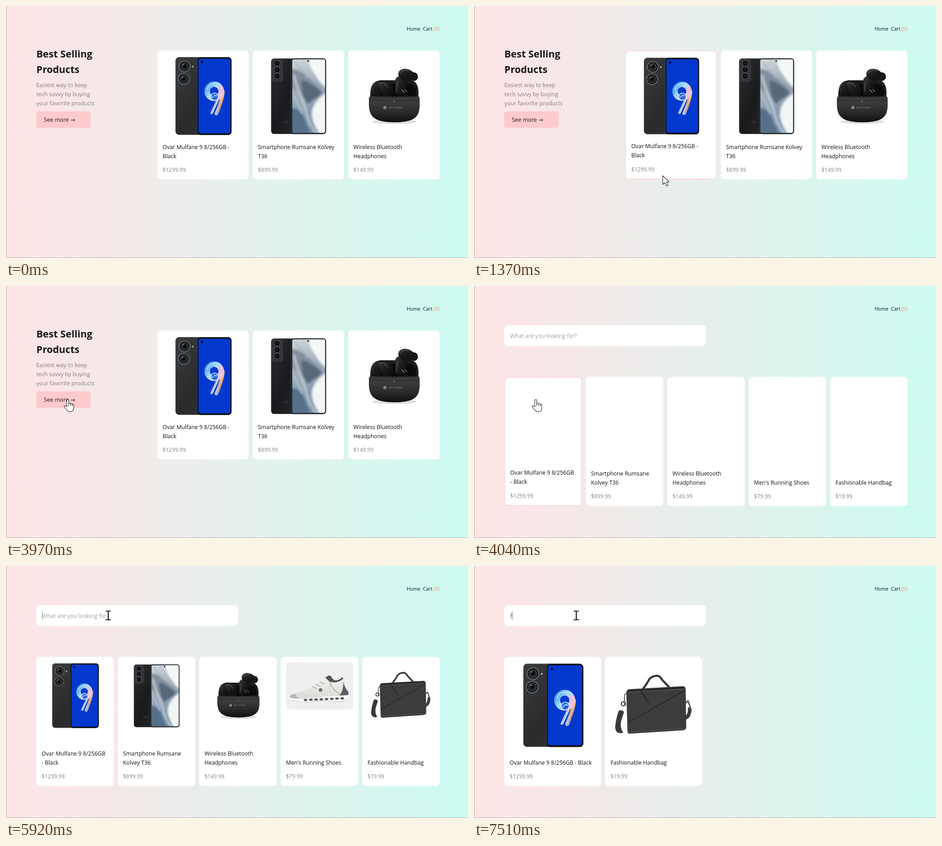
An HTML page for the animation above (8 s loop, 1012 by 553 pixels).

```html
<!DOCTYPE html>
<html lang="en">
<head>
<meta charset="utf-8">
<title>Shop</title>
<style>
  html, body { margin: 0; width: 100%; height: 100%; overflow: hidden; }
  svg { display: block; width: 100vw; height: 100vh; font-family: "Open Sans", "Noto Sans", "DejaVu Sans", sans-serif; }
  text { white-space: pre; }
  .title { font-size: 12.2px; font-weight: 500; fill: #111215; }
  .price { font-size: 11.85px; fill: #858688; }
  .copy { font-size: 12.35px; fill: #877f80; }
  .head { font-size: 21.4px; font-weight: 700; fill: #17181b; }
  .nav { font-size: 10.6px; fill: #111215; }
  .hint { font-size: 12.3px; font-weight: 500; fill: #98a0ab; }
</style>
</head>
<body>
<svg viewBox="0 0 1012 553">
  <defs>
    <linearGradient id="page"><stop stop-color="#ffe4e6"/><stop offset="1" stop-color="#ccfbf1"/></linearGradient>
    <linearGradient id="back" x2="1" y2="1"><stop stop-color="#3a3c3d"/><stop offset=".5" stop-color="#292b2c"/><stop offset="1" stop-color="#303233"/></linearGradient>
    <linearGradient id="black" x2="1" y2="1"><stop stop-color="#2e2f32"/><stop offset=".5" stop-color="#191a1c"/><stop offset="1" stop-color="#28292c"/></linearGradient>
    <linearGradient id="ring" x2="1" y2=".7"><stop stop-color="#3f9cf5"/><stop offset=".5" stop-color="#a8dcfa"/><stop offset="1" stop-color="#f3c3dc"/></linearGradient>
    <linearGradient id="stem" x1="1" x2="0" y2="1"><stop stop-color="#f2b98a"/><stop offset=".5" stop-color="#c9946f"/><stop offset="1" stop-color="#9fb8ee"/></linearGradient>
    <linearGradient id="sky" x2=".25" y2="1"><stop stop-color="#d3d9de"/><stop offset=".45" stop-color="#a3aebb"/><stop offset="1" stop-color="#7690a8"/></linearGradient>
    <linearGradient id="case" x2="0" y2="1"><stop stop-color="#2c2c2e"/><stop offset=".25" stop-color="#3b3a3d"/><stop offset=".6" stop-color="#2b2a2d"/><stop offset="1" stop-color="#0f0f11"/></linearGradient>
    <linearGradient id="bud" x2="1" y2="1"><stop stop-color="#3a3a3d"/><stop offset=".5" stop-color="#1a1a1c"/><stop offset="1" stop-color="#0c0c0e"/></linearGradient>
    <linearGradient id="upper" x2="0" y2="1"><stop stop-color="#f3f2ef"/><stop offset="1" stop-color="#dddbd5"/></linearGradient>
    <clipPath id="screen"><rect x="75" y="8" width="72" height="161.5" rx="4"/></clipPath>
    <filter id="soft" x="-.3" y="-.3" width="1.6" height="1.6"><feGaussianBlur stdDeviation="2.4"/></filter>
  </defs>
  <rect width="1012" height="553" fill="url(#page)"/>
  <g id="view"></g>
  <path d="M.5 0V552.5H1012" fill="none" stroke="#bdb3b5"/>
  <g id="cursor"></g>
</svg>
<script>
const LOOP = 8000;
const view = document.getElementById('view');
const cursor = document.getElementById('cursor');

const text = (cls, x, y, s, extra = '') => `<text class="${cls}" x="${x}" y="${y}" ${extra}>${s}</text>`;
const rect = (x, y, w, h, r, fill, extra = '') =>
  `<rect x="${x}" y="${y}" width="${w}" height="${h}" rx="${r}" fill="${fill}" ${extra}/>`;
const disc = (x, y, r, fill, extra = '') => `<circle cx="${x}" cy="${y}" r="${r}" fill="${fill}" ${extra}/>`;
const shape = (d, fill) => `<path d="${d}" fill="${fill}"/>`;
const line = (d, stroke, w = 1) =>
  `<path d="${d}" fill="none" stroke="${stroke}" stroke-width="${w}" stroke-linecap="round" stroke-linejoin="round"/>`;
const lens = (x, y, r) => disc(x, y, r, '#141516', 'stroke="#85878a" stroke-width="1.3"') +
  disc(x, y, r * .68, '#232629', 'stroke="#4c5054"') + disc(x, y, r * .3, '#07080a') + disc(x - r * .25, y - r * .3, r * .13, '#7d8790');

function bluePhone() {
  return rect(28.5, 3.5, 122, 170, 7, 'url(#back)', 'stroke="#55585a"') +
    lens(48, 23.5, 12) + lens(46.5, 51, 12) + disc(66, 24, 1.8, '#c3bfba') +
    disc(37, 78, 2.5, '#3d4041') +
    rect(76, 3.5, 75, 170.5, 7, '#0b0c12', 'stroke="#4c4e50" stroke-width=".8"') +
    rect(78.5, 6.5, 70, 164, 5, '#0338cf') + disc(86.5, 13.5, 2.6, '#070a16') +
    line('M132 79Q131 96 118 127', 'url(#stem)', 8) +
    line('M121 96L107 126', '#a9c2f3', 5) + line('M122 98L109 127', '#eef3fd', 1.3) + line('M132 84Q129 104 115 129', '#f8dcc0', 1.3) +
    disc(113, 78, 15.5, 'none', 'stroke="url(#ring)" stroke-width="12"') +
    line('M97 74Q101 61 116 61', '#d8f0ff', 1.5) + disc(128, 73, 5, '#f4bcd6', 'opacity=".7"') +
    disc(114, 90, 8, '#2b62d8', 'stroke="#b7d9fb" stroke-width="2"') + line('M109 92Q113 86 119 88', '#dcefff', 1.4);
}

function wallpaper() {
  return `<g clip-path="url(#screen)">` + rect(75, 7, 73, 163, 0, 'url(#sky)') + `<g filter="url(#soft)">` +
    shape('M106 0H155V74C138 66 128 46 118 32Z', '#f4f7f7') +
    shape('M70 30C86 28 99 36 112 50C126 62 139 70 142 84C134 98 122 90 110 98C94 96 84 72 70 70Z', '#8490a0') +
    shape('M95 54C110 54 124 70 139 78C134 94 119 93 111 106C101 101 95 74 95 54Z', '#56677a') +
    shape('M155 78C132 92 116 108 118 134C121 154 132 166 138 180H155Z', '#f2f6f4') +
    shape('M70 116C86 112 98 124 104 146C108 160 116 168 118 180H70Z', '#567089') +
    line('M79 44C84 72 94 86 102 112S110 148 128 172', '#d0dbe3', 3.5) +
    line('M82 14C90 30 101 34 108 46', '#b0b9c3', 4) + line('M78 86C84 104 92 106 96 126', '#b3c7d6', 3) +
    `</g></g>`;
}

function blackPhone() {
  return rect(29, 6.5, 70, 165, 6, 'url(#black)', 'stroke="#3c3d40"') +
    shape('M29 14Q29 7 36 7H50Q55 7 55 13V51Q55 57 49 57H29Z', '#35363a') +
    [17, 31, 45].map(y => disc(42, y, 6, '#08090a', 'stroke="#65676b" stroke-width=".8"') + disc(42, y, 2, '#272b35')).join('') +
    rect(56, 143, 10, 4, 1, '#2d2e31') +
    rect(73, 6, 76, 166, 6, '#141518', 'stroke="#505257" stroke-width=".8"') +
    wallpaper() + disc(110, 11.5, 1.9, '#15171a');
}

function earbuds() {
  return `<ellipse cx="90" cy="145" rx="49" ry="5" fill="#dedee0"/>` +
    shape('M37 91C36 63 45 53 66 54H125C139 54 145 71 142 92Z', '#1b1b1d') +
    shape('M43 88C43 69 50 62 68 62H124C136 63 138 76 137 90Z', '#0b0b0d') +
    `<ellipse cx="53" cy="73" rx="14" ry="15" fill="url(#bud)"/>` + shape('M54 59Q74 53 86 68L85 89H65Z', 'url(#bud)') +
    line('M58 60Q70 59 75 69', '#59595c', 1.3) +
    shape('M92 51Q103 38 120 47L111 81Q102 91 92 82Z', 'url(#bud)') +
    `<ellipse cx="116" cy="42" rx="18" ry="13" fill="url(#bud)" transform="rotate(15 116 42)"/>` +
    disc(132, 46, 9.5, '#18181a') + line('M101 39Q108 29 122 32', '#626266', 1.4) + line('M97 57L94 78', '#4b4b4f', 1.8) +
    line('M106 75L112 81M113 74L117 79', '#a4a4a7', 1.2) +
    shape('M34 94Q34 88 41 88.5Q90 91 138 88.5Q145 88 145 94C146 119 145 133 127 141C109 148 71 148 53 141C35 133 33 119 34 94Z', 'url(#case)') +
    line('M37 93Q90 96 142 93', '#59585b', 1) + disc(89, 100, 1, '#d9d6cd') +
    disc(69, 114, 3.7, '#8c7a74') + `<text x="77" y="116" font-size="5" letter-spacing="1.3" fill="#b2b0b1">VELTUNO</text>`;
}

function shoe() {
  const pods = Array.from({ length: 8 }, (_, i) =>
    `<ellipse cx="${43 + i * 11.5}" cy="${83 - i * .5}" rx="4" ry="2.5" fill="#56585b"/>`).join('');
  return rect(0, 0, 147, 104, 8, '#efeff0') +
    shape('M7 76C20 77 43 78 60 74L137 71Q141 77 134 84Q119 89 100 87L39 90Q16 90 7 80Z', '#f9f9f7') +
    line('M12 83Q36 91 60 87T104 86T135 82', '#bdbbb6', 1) + pods +
    shape('M8 77C8 69 23 68 40 62C56 56 72 43 94 29L99 31Q103 40 110 40Q118 39 123 33L127 35C126 47 138 60 137 72C120 77 100 72 76 77C47 81 20 82 8 77Z', 'url(#upper)') +
    shape('M86 34L94 29L99 31Q103 40 110 40Q118 39 123 33L126 36Q113 48 96 43Z', '#54565a') +
    shape('M126 41Q128 57 137 65V72L117 73Q126 65 126 41Z', '#5b5e62') +
    shape('M8 77Q11 69 22 70Q20 76 31 79Q17 81 8 77Z', '#b8b8b7') +
    line('M58 53L67 58M66 48L75 53M74 43L83 48M96 43Q102 62 119 70', '#8d9093', 1.1) +
    line('M33 67Q42 72 44 79M97 46Q92 67 104 73', '#c7c5bf', 1) + disc(76, 61, 4, '#707174');
}

function bag() {
  return line('M31 49L24 56V72', '#77797a', 2) + disc(22, 71, 3.5, 'none', 'stroke="#45474a" stroke-width="2"') +
    shape('M14 83Q19 80 23 85L18 101Q16 114 22 120Q9 124 8 111Q9 97 14 83Z', '#39393b') +
    line('M126 71L132 66L136 77', '#555759', 2.5) + shape('M132 76L138 79Q138 95 128 98V91Q132 89 132 76Z', '#3c3d3f') +
    line('M55 46Q62 37 66 29Q70 24 79 23Q84 23 88 30L100 43', '#353638', 3.6) +
    shape('M32 46L124 41Q128 42 128 47L129 111Q129 115 124 116L33 122Q29 122 29 118L27 52Q27 47 32 46Z', '#3b3c3d') +
    line('M31 49L125 43.5', '#202123', 2) + line('M32 51L125 46', '#656667', .7) +
    line('M30 103L127 48M51 49L67 73M51 49L60 60', '#202123', 1.1) + line('M31 119L126 113', '#555657', .8);
}

// Each drawing uses its own square unit size.
const phoneTitle = 'Ovar Mulfane 9 8/256GB';
const products = [
  { draw: bluePhone, unit: 177, price: '1299.99', lines: [[phoneTitle + ' -', 'Black'], [phoneTitle, '- Black'], [phoneTitle + ' - Black']] },
  { draw: blackPhone, unit: 177, price: '899.99', lines: [['Smartphone Rumsane Kolvey', 'T36'], ['Smartphone Rumsane', 'Kolvey T36']] },
  { draw: earbuds, unit: 177, price: '149.99', lines: Array(2).fill(['Wireless Bluetooth', 'Headphones']) },
  { draw: shoe, unit: 147, price: '79.99', lines: Array(2).fill(["Men's Running Shoes"]) },
  { draw: bag, unit: 147, price: '19.99', lines: Array(3).fill(['Fashionable Handbag']) }
];

// Pages: landing, full catalogue, search result
const pages = [
  { x: 331.5, y: 97.5, w: 200, pitch: 209, items: [0, 1, 2] },
  { x: 66.3, y: 199.5, w: 170, pitch: 178.45, items: [0, 1, 2, 3, 4] },
  { x: 66.3, y: 199.5, w: 212.4, pitch: 221, items: [0, 4] }
];
const CARD_H = 283, PAD = 11.6, BORDER = 1.4;

function card(page, slot, hovered, loaded) {
  const p = pages[page], item = products[p.items[slot]], x = p.x + slot * p.pitch;
  const inset = PAD + (hovered ? BORDER : 0), left = x + inset;
  const base = p.y + CARD_H - (hovered ? BORDER : 0), lines = item.lines[page];
  const scale = (p.w - 2 * inset) / item.unit;
  return rect(x, p.y, p.w, CARD_H, 8, '#fff') +
    (hovered ? rect(x + .7, p.y + .7, p.w - BORDER, CARD_H - BORDER, 7.5, 'none', `stroke="#fecdd3" stroke-width="${BORDER}"`) : '') +
    (loaded ? `<g transform="translate(${left} ${p.y + inset}) scale(${scale})">${item.draw()}</g>` : '') +
    lines.map((s, i) => text('title', left, base - 47 - 19.8 * (lines.length - 1 - i), s)).join('') +
    text('price', left, base - 16.3, '$' + item.price);
}

function draw({ page, hover, loaded, caret }) {
  let out = text('nav', 877.7, 54, 'Home') + text('nav', 913.3, 54, 'Cart') + text('nav', 937, 54, '(0)', 'style="fill:#e5967a"');
  if (page === 0) {
    out += text('head', 66.5, 113, 'Best Selling') + text('head', 66.5, 146.5, 'Products') +
      ['Easiest way to keep', 'tech savvy by buying', 'your favorite products'].map((s, i) => text('copy', 66.5, 178.3 + i * 19.8, s)).join('') +
      rect(66, 231, 119.7, 36.3, 5, '#fecacd') + text('copy', 83, 253.8, 'See more →', 'style="fill:#17181b"');
  } else {
    out += rect(66.3, 86.5, 441.7, 45, 8, '#fff') +
      (page === 1 ? text('hint', 79, 114, 'What are you looking for?') : text('copy', 79, 114, 'f', 'style="fill:#777"'));
    if (caret) out += rect(page === 1 ? 79 : 83, 100, 1, 18, 0, page === 1 ? '#8a8f70' : '#666');
  }
  view.innerHTML = out + pages[page].items.map((_, i) => card(page, i, i === hover, loaded)).join('');
}

// Pointer moves: start, end, number of intervals, path points (quadratic when three)
const moves = [
  [460, 1230, 11, [259, 518], [335, 400], [397, 373]],
  [1300, 1370, 1, [407, 372], [413, 372]],
  [2260, 2540, 4, [414, 364], [425, 291]],
  [2740, 3300, 8, [421, 286], [135, 249]],
  [4630, 4900, 4, [146, 238], [276, 119]],
  [5300, 5520, 3, [266, 116], [224, 108.5]]
];

function pointer(t) {
  const move = moves.filter(m => t >= m[0]).pop();
  if (!move) return null;
  const [start, end, n, a, ...rest] = move;
  const b = rest.at(-1), c = rest.length > 1 ? rest[0] : [(a[0] + b[0]) / 2, (a[1] + b[1]) / 2];
  const s = Math.min(1, Math.floor((t - start) / (end - start) * n + 1e-6) / n);
  const u = s * s * (3 - 2 * s);
  return [0, 1].map(k => (1 - u) ** 2 * a[k] + 2 * u * (1 - u) * c[k] + u * u * b[k]);
}

const outline = d => `<path d="${d}" fill="#fff" stroke="#1c1c22" stroke-width="1.1" stroke-linejoin="round"/>`;
const cursors = {
  arrow: outline('M.5 .5V19.6L5 15.5L8.5 22.8L12 21.2L8.6 14.3H14.7Z'),
  hand: outline('M-1.8 2Q-1.5 0 .2 0Q2.3 0 2.5 2.2V10Q2.8 7.7 4.7 8Q6.4 8.2 6.5 10Q7 8.7 8.6 9Q10.3 9.4 10.3 11Q11.2 10 12.3 10.6Q13.5 11.1 13.5 13V18Q13.5 26.7 6 27Q1 27.2-2 23L-7 16.5Q-8.2 14.5-6.4 13.8Q-4.8 13.3-1.8 16Z') +
    line('M2.5 10V14M6.5 10V14M10.3 11V14.5', '#1c1c22'),
  beam: line('M-5-9.7H-2Q0-9.7 0-8Q0-9.7 2-9.7H5M-5 9.7H-2Q0 9.7 0 8Q0 9.7 2 9.7H5', '#0c0c0e', 1.8) + line('M0-8V8', '#0c0c0e', 2)
};

const inside = ([px, py], x, y, w, h) => px >= x && px <= x + w && py >= y && py <= y + h;

function cursorKind(pos, page, t) {
  if (page === 0) return inside(pos, 66, 231, 120, 36) ? 'hand' : 'arrow';
  if (t < 4630) return 'hand';
  return inside(pos, 66, 86, 442, 46) ? 'beam' : 'arrow';
}

let lastView = '', lastCursor = '';
function render(t) {
  const page = t < 4040 ? 0 : t < 7510 ? 1 : 2;
  const pos = pointer(t), p = pages[page];
  const hover = pos ? p.items.findIndex((_, i) => inside(pos, p.x + i * p.pitch, p.y, p.w, CARD_H)) : -1;
  const caret = t >= 7510 || (t >= 5850 && Math.floor((t - 5850) / 530) % 2 === 0);
  const state = { page, hover, loaded: page !== 1 || t >= 4170, caret };
  const key = JSON.stringify(state);
  if (key !== lastView) draw(state);
  lastView = key;

  const kind = pos ? cursorKind(pos, page, t) : '';
  if (kind !== lastCursor) cursor.innerHTML = cursors[kind] || '';
  lastCursor = kind;
  if (pos) cursor.setAttribute('transform', `translate(${pos[0]} ${pos[1]})`);
}

const began = performance.now();
function tick() {
  render((performance.now() - began) % LOOP);
  requestAnimationFrame(tick);
}
tick();
</script>
</body>
</html>
```
